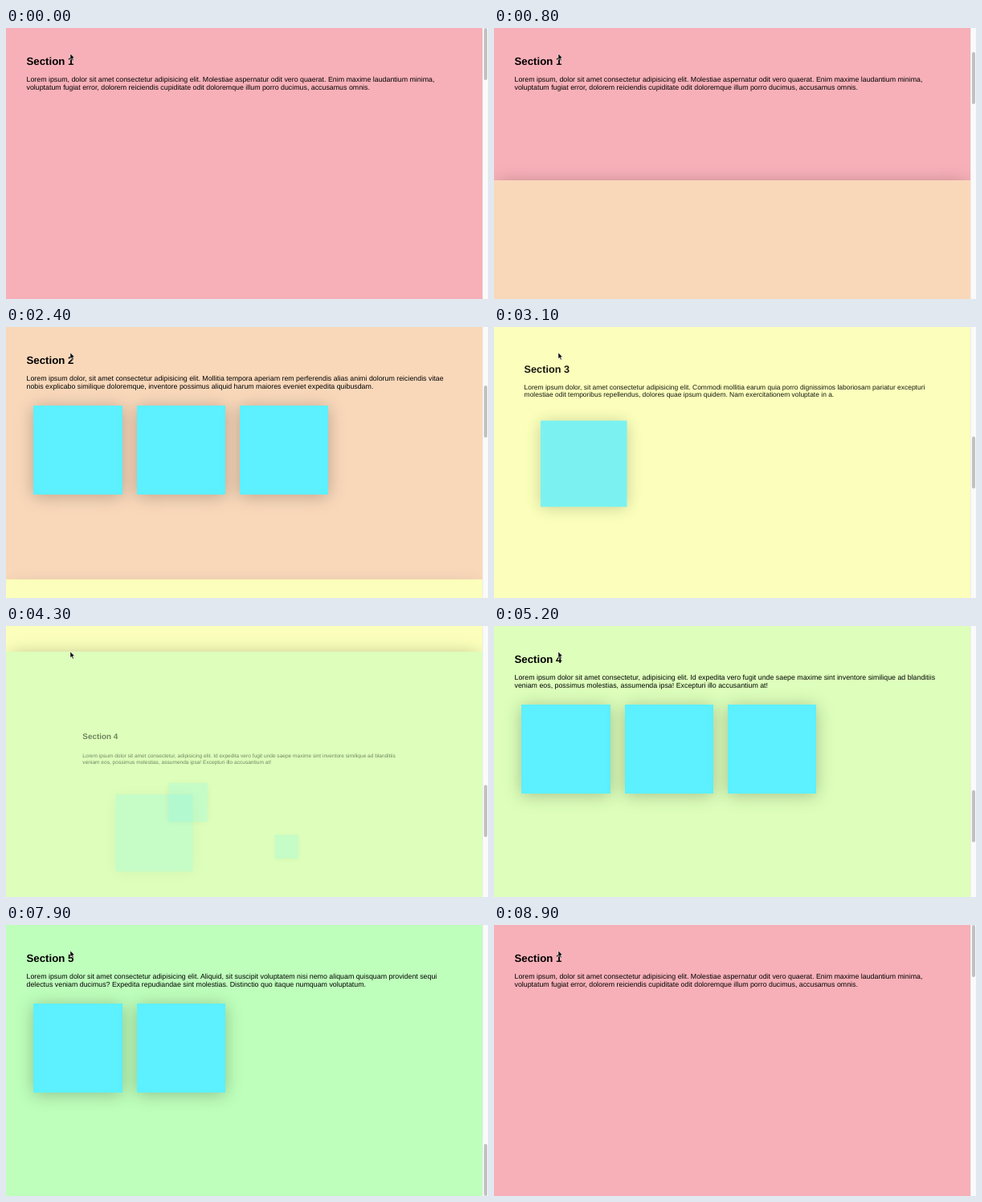
Recreate the animation shown at these times as an HTML page. Size 600 by 338 pixels, loop 9 s.

```html
<!DOCTYPE html>
<html lang="en">
<head>
<meta charset="utf-8">
<title>Stacked sections</title>
<style>
  html, body { margin: 0; width: 100%; height: 100%; overflow: hidden; }
  #stage {
    position: relative; width: 600px; height: 338px; overflow: hidden;
    background: #fafafa; color: #000;
    font: 8.83px/9.94px "Liberation Sans", Arial, sans-serif;
    text-rendering: geometricPrecision;
  }
  section { position: absolute; left: 0; top: 0; width: 592.5px; height: 338px; }
  section::before {
    content: ""; position: absolute; inset: 0; opacity: var(--shade, 0);
    box-shadow: 0 0 22px -6px rgba(0, 0, 0, .35);
  }
  .fill { position: absolute; inset: 0; overflow: hidden; }
  h2, p { position: absolute; left: 25.5px; width: 541.5px; margin: 0; white-space: nowrap; }
  h2 { top: 34px; font-size: 13.25px; line-height: 15.2px; }
  p { top: 60.1px; }
  .box {
    position: absolute; top: 98px; width: 110.6px; height: 110.6px;
    background: #5df0ff; box-shadow: 0 2px 20px rgba(0, 0, 0, .25);
  }
  #track {
    position: absolute; left: 592.5px; top: 0; width: 7.5px; height: 338px;
    background: #fafafa; border-left: 1px solid #ececec; box-sizing: border-box;
  }
  #thumb {
    position: absolute; left: 594.5px; top: 0; width: 4.5px; height: 65px;
    border-radius: 2.5px; background: #c1c1c1;
  }
  #cursor { position: absolute; left: 78px; top: 30px; }
</style>
</head>
<body>
<div id="stage"></div>
<script>
const LOOP = 9000, H = 338;
const SCROLL = 750, LAG = 386, REVEAL = 700, BOX_DELAY = 100;
const BACK_AT = 8050, BACK = 700;

const SECTIONS = [
  { color: "#f7b0b8", boxes: 0, lines: [
    "Lorem ipsum, dolor sit amet consectetur adipisicing elit. Molestiae aspernatur odit vero quaerat. Enim maxime laudantium minima,",
    "voluptatum fugiat error, dolorem reiciendis cupiditate odit doloremque illum porro ducimus, accusamus omnis."] },
  { color: "#f9d8ba", boxes: 3, at: 450, lines: [
    "Lorem ipsum dolor, sit amet consectetur adipisicing elit. Mollitia tempora aperiam rem perferendis alias animi dolorum reiciendis vitae",
    "nobis explicabo similique doloremque, inventore possimus aliquid harum maiores eveniet expedita quibusdam."] },
  { color: "#fbffbb", boxes: 1, at: 2262, lines: [
    "Lorem ipsum dolor, sit amet consectetur adipisicing elit. Commodi mollitia earum quia porro dignissimos laboriosam pariatur excepturi",
    "molestiae odit temporibus repellendus, dolores quae ipsum quidem. Nam exercitationem voluptate in a."] },
  { color: "#ddffbb", boxes: 3, at: 3714, lines: [
    "Lorem ipsum dolor sit amet consectetur, adipisicing elit. Id expedita vero fugit unde saepe maxime sint inventore similique ad blanditiis",
    "veniam eos, possimus molestias, assumenda ipsa! Excepturi illo accusantium at!"] },
  { color: "#beffbb", boxes: 2, at: 5609, lines: [
    "Lorem ipsum dolor sit amet consectetur adipisicing elit. Aliquid, sit suscipit voluptatem nisi nemo aliquam quisquam provident sequi",
    "delectus veniam ducimus? Expedita repudiandae sint molestias. Distinctio quo itaque numquam voluptatum."] }
];

// Where each box starts: x and y shift, scale
const TEXT_FROM = [0, 126, .5];
const BOX_FROM = [[115, 88, .84], [10, 42, .32], [3.5, 109, .11]];

const stage = document.getElementById("stage");

function add(parent, tag, props = {}) {
  const el = Object.assign(document.createElement(tag), props);
  parent.append(el);
  return el;
}

for (const [i, s] of SECTIONS.entries()) {
  s.el = add(stage, "section");
  const fill = add(s.el, "div", { className: "fill" });
  fill.style.background = s.color;
  s.text = [
    add(fill, "h2", { textContent: "Section " + (i + 1) }),
    add(fill, "p", { innerHTML: s.lines.join("<br>") })
  ];
  s.tiles = Array.from({ length: s.boxes }, (_, n) => {
    const box = add(fill, "div", { className: "box" });
    box.style.left = 34.3 + n * 128.2 + "px";
    return box;
  });
}
add(stage, "div", { id: "track" });
const thumb = add(stage, "div", { id: "thumb" });
stage.insertAdjacentHTML("beforeend",
  `<svg id="cursor" width="10" height="14" viewBox="0 0 10 14">
    <path d="M2 2V9.6L3.7 8L5 11L6.3 10.4L5 7.6H7.3Z" fill="#000" stroke="#fff" stroke-width=".5"/>
  </svg>`);

const clamp = x => Math.min(1, Math.max(0, x));
const inOut = u => u < .5 ? 2 * u * u : 1 - 2 * (1 - u) ** 2;
const bez = (a, b, k) => 3 * a * k * (1 - k) ** 2 + 3 * b * k * k * (1 - k) + k ** 3;

// cubic-bezier(.25, .1, .25, 1)
function ease(x) {
  let lo = 0, hi = 1;
  for (let i = 0; i < 24; i++) {
    const mid = (lo + hi) / 2;
    if (bez(.25, .25, mid) < x) lo = mid; else hi = mid;
  }
  return bez(.1, 1, lo);
}

function pose(el, [x, y, scale], done) {
  const left = 1 - done;
  el.style.opacity = done;
  el.style.transform = left < .0005 ? "none" :
    `translate(${x * left}px, ${y * left}px) scale(${1 - (1 - scale) * left})`;
}

function scrollAt(t) {
  let pos = 0;
  for (const s of SECTIONS) if (s.at) pos += inOut(clamp((t - s.at) / SCROLL));
  return pos * (1 - inOut(clamp((t - BACK_AT) / BACK)));
}

function draw(t) {
  const pos = scrollAt(t);
  thumb.style.transform = `translateY(${pos * 68.25}px)`;
  SECTIONS.forEach((s, i) => {
    const top = Math.max(0, (i - pos) * H);
    s.el.style.transform = `translateY(${top}px)`;
    s.el.style.visibility = top < H ? "visible" : "hidden";
    s.el.style.setProperty("--shade", clamp((H - top) / 60));
    if (!s.at) return;
    const since = t - s.at - LAG;
    const shown = ease(clamp(since / REVEAL));
    const boxShown = ease(clamp((since - BOX_DELAY) / REVEAL));
    s.text.forEach(el => pose(el, TEXT_FROM, shown));
    s.tiles.forEach((el, n) => pose(el, BOX_FROM[n], boxShown));
  });
}

const start = performance.now();
function tick() {
  draw((performance.now() - start) % LOOP);
  requestAnimationFrame(tick);
}
tick();
</script>
</body>
</html>
```
